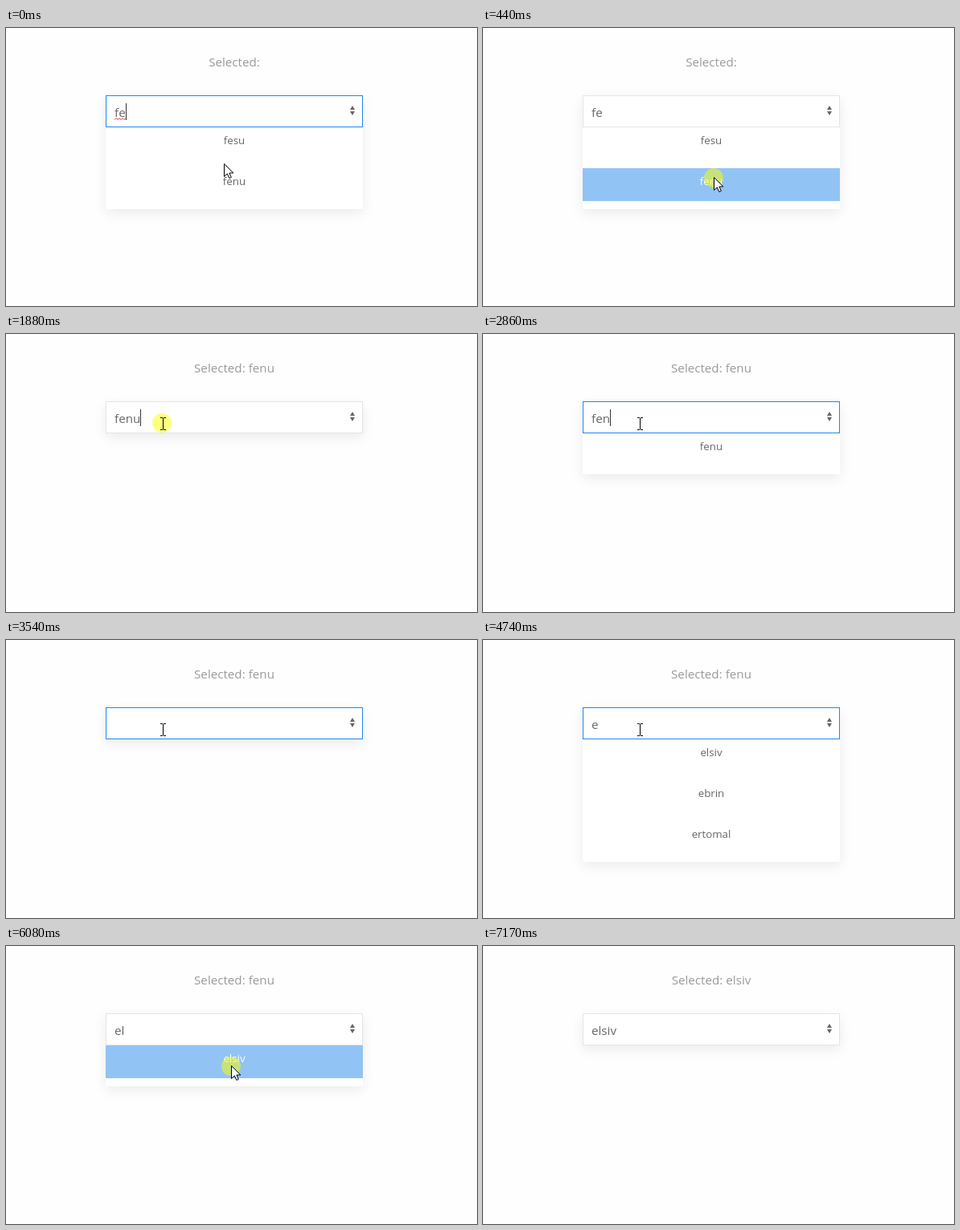
An HTML page that plays this animation: 586x347 px, repeating every 7720 ms.

```html
<!DOCTYPE html>
<html lang="en">
<head>
<meta charset="utf-8">
<title>Autocomplete select</title>
<style>
  html, body { margin: 0; width: 100%; height: 100%; overflow: hidden; background: #fefefe; }
  #panel, #field { position: absolute; left: 124px; top: 84px; width: 320px; height: 40px; box-sizing: border-box; background: #fff; }
  #panel { box-shadow: 0 5px 15px rgba(0, 0, 0, .08); }
  #field { border: 1px solid #e5e5e5; }
  #field.focus { border-color: #1e87f0; }
  svg { position: absolute; left: 0; top: 0; }
  text { font-family: "Open Sans", "Noto Sans", sans-serif; font-size: 15.2px; fill: #666; white-space: pre; }
  .mid { text-anchor: middle; }
  #title { fill: #999; }
  .item text { font-size: 13.3px; }
  .item rect { fill: none; }
  .item.hot rect { fill: #92c3f5; }
  .item.hot text { fill: #fff; }
</style>
</head>
<body>
<div id="panel"></div>
<div id="field"></div>
<svg width="586" height="347" viewBox="0 0 586 347">
  <text id="title" class="mid" x="284" y="48"></text>
  <text id="value" x="135" y="111"></text>
  <path id="wave" fill="none" stroke="#e8202a"/>
  <rect id="caret" y="94" width="1" height="21" fill="#333"/>
  <path d="M431 97l-3 5h6zM431 109l-3-5h6z" fill="#666"/>
  <g id="list"></g>
  <circle id="click" r="12" fill="#ff0" fill-opacity=".5"/>
  <path id="arrow" d="M.5.5V16.5L4.3 12.9 6.8 18.5 9.3 17.4 6.9 12H11.8Z" fill="#fff" stroke="#000"/>
  <path id="beam" d="M-3 -7.5H0M1 -7.5H4M.5 -7V7M-3 7.5H0M1 7.5H4" fill="none" stroke="#000"/>
</svg>
<script>
const LOOP = 7720, PITCH = 51, ITEM = 41, TOP = 124;
const names = ['fesu', 'fenu', 'forgil', 'elsiv', 'ebrin', 'ertomal'];
const $ = id => document.getElementById(id);

// Each step overrides the state before it; query is the list's filter.
const steps = [
  [0, { sel: '', text: 'fe', query: 'fe', focus: 1, caret: 1, click: 0, cursor: 'arrow', at: [271, 169] }],
  [100, { at: [275, 174] }],
  [210, { at: [282, 182] }],
  [320, { at: [287, 186] }],
  [440, { click: 1, focus: 0, caret: 0 }],
  [550, {}],
  [660, { sel: 'fenu', text: 'fenu', query: '', click: 0, cursor: 'beam' }],
  [1000, { cursor: 'arrow', at: [290, 186] }],
  [1110, { at: [279, 177] }],
  [1220, { at: [254, 157] }],
  [1330, { at: [224, 134] }],
  [1440, { cursor: 'beam', at: [201, 115] }],
  [1560, { at: [195, 112] }],
  [1880, { click: 1, caret: 1 }],
  [2000, { focus: 1 }],
  [2100, { click: 0 }],
  [2430, { caret: 0 }],
  [2860, { text: 'fen', query: 'fen', caret: 1 }],
  [2970, { text: 'fe', query: 'fe' }],
  [3090, { text: 'f' }],
  [3200, { query: 'f' }],
  [3420, { text: '' }],
  [3540, { query: '', caret: 0 }],
  [4090, { text: 'e', caret: 1 }],
  [4190, { query: 'e' }],
  [4740, { caret: 0 }],
  [4850, { text: 'el', query: 'el', caret: 1 }],
  [4960, { at: [193, 117] }],
  [5070, { cursor: 'arrow', at: [187, 132] }],
  [5180, { at: [181, 147] }],
  [5300, { at: [179, 152] }],
  [5400, { caret: 0 }],
  [5520, { at: [190, 152] }],
  [5630, { at: [221, 151] }],
  [5740, { at: [256, 150] }],
  [5850, { at: [280, 149] }],
  [5960, { click: 1, focus: 0 }],
  [6080, {}],
  [6180, { sel: 'elsiv', text: 'elsiv', query: '', click: 0, at: [282, 150] }],
  [6300, { at: [285, 149] }],
  [6410, { at: [289, 148] }],
  [6520, { at: [291, 148] }],
  [6850, { at: [320, 171] }],
  [6960, { at: [415, 246] }],
  [7060, { at: [499, 312] }],
  [7170, { cursor: 'none' }]
];

let last = {};
const states = steps.map(([time, change]) => last = { ...last, ...change, time });

function show(id, on) {
  $(id).setAttribute('visibility', on ? 'visible' : 'hidden');
}

function wavePath(width) {
  let d = 'M135 114.5';
  for (let x = 2, up = true; x <= width + 1; x += 2, up = !up) d += `L${135 + x} ${up ? 112.5 : 114.5}`;
  return d;
}

function drawList(s) {
  const items = s.query ? names.filter(n => n.startsWith(s.query)) : [];
  $('panel').style.height = 40 + items.length * PITCH + 'px';
  $('list').innerHTML = items.map((name, i) => {
    const y = TOP + i * PITCH;
    const hot = s.cursor === 'arrow' && s.at[1] >= y && s.at[1] < y + ITEM;
    return `<g class="item${hot ? ' hot' : ''}"><rect x="124" y="${y}" width="320" height="${ITEM}"/>` +
      `<text class="mid" x="284" y="${y + 21}">${name}</text></g>`;
  }).join('');
}

function draw(s) {
  $('title').textContent = s.sel ? 'Selected: ' + s.sel : 'Selected:';
  $('value').textContent = s.text;
  $('field').className = s.focus ? 'focus' : '';
  const width = s.text ? $('value').getComputedTextLength() : 0;
  $('caret').setAttribute('x', Math.round(135 + width));
  show('caret', s.caret);
  $('wave').setAttribute('d', wavePath(width));
  show('wave', s.focus && s.text.length === 2);
  drawList(s);

  const [x, y] = s.at;
  for (const id of ['arrow', 'beam']) {
    $(id).setAttribute('transform', `translate(${x} ${y})`);
    show(id, s.cursor === id);
  }
  $('click').setAttribute('cx', s.cursor === 'beam' ? x - 1 : x);
  $('click').setAttribute('cy', s.cursor === 'beam' ? y - 1 : y + 1);
  show('click', s.click);
}

let shown;
const start = performance.now();
function tick() {
  const t = (performance.now() - start) % LOOP;
  const s = states.findLast(k => k.time <= t) || states[0];
  if (s !== shown) draw(shown = s);
  requestAnimationFrame(tick);
}
tick();
</script>
</body>
</html>
```
